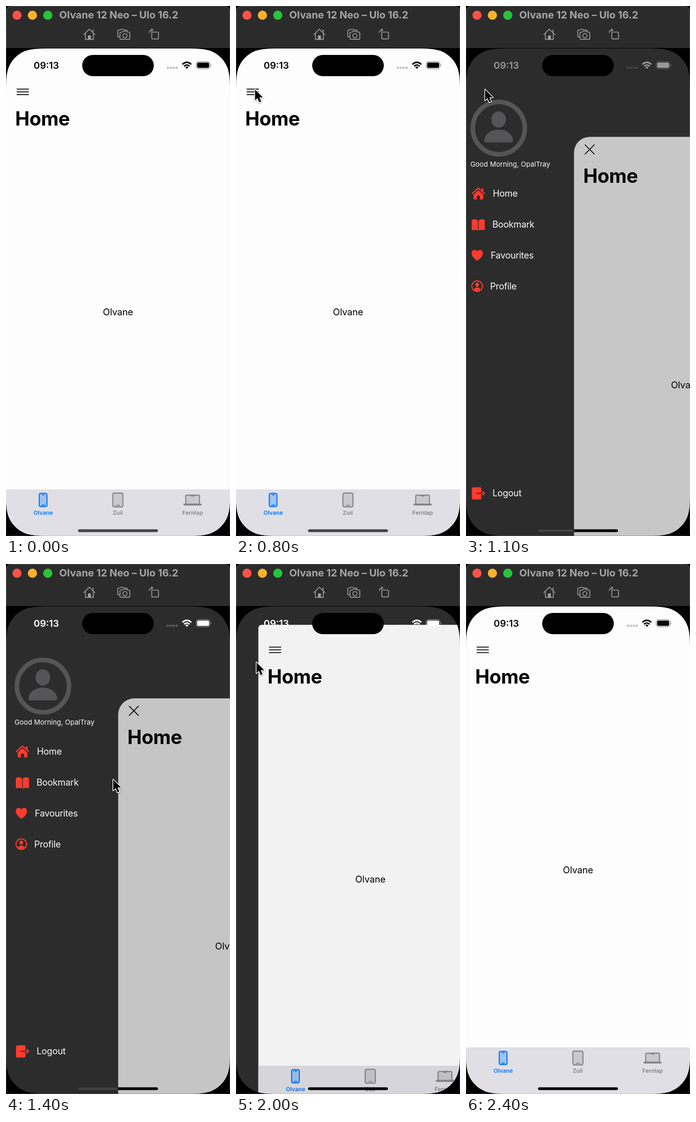
These frames come from a looping animation (488x1148 px, 2.5 s). An HTML page:

```html
<!DOCTYPE html>
<html lang="en">
<head>
<meta charset="utf-8">
<title>Slide menu</title>
<style>
  html, body { margin: 0; width: 100%; height: 100%; overflow: hidden; background: #000; }
  svg { display: block; width: 100%; height: 100%; font-family: Inter, "Liberation Sans", sans-serif; }
  .line { fill: none; stroke-linecap: round; stroke-linejoin: round; }
  .tools { stroke: #a3a3a3; stroke-width: 1.7; }
  .glyph { stroke: #161616; stroke-width: 2; }
  .menu { font-size: 19.6px; letter-spacing: -.25px; fill: #fafafa; }
  .red { fill: #ff3b30; }
  .tab { font-size: 12.4px; font-weight: 600; text-anchor: middle; fill: #85858a; }
  .device { fill: #c8c8cd; stroke: #85858a; stroke-width: 2.4; }
  .on { fill: #0a78f0; }
  .device.on { fill: #9dc3ee; stroke: #0a78f0; }
  #cursor { filter: drop-shadow(0 1.5px 1.5px rgba(0, 0, 0, .4)); }
</style>
</head>
<body>
<svg viewBox="0 0 488 1148" preserveAspectRatio="none">
  <defs>
    <clipPath id="screen"><path id="outline"/></clipPath>
  </defs>

  <rect width="488" height="1148"/>
  <path fill="#2b2b2b" d="M0 91V12Q0 0 12 0H476Q488 0 488 12V91Z"/>
  <circle cx="24" cy="20" r="10" fill="#fe5249"/>
  <circle cx="57.5" cy="20" r="10" fill="#fdb12e"/>
  <circle cx="91" cy="20" r="10" fill="#27c33a"/>
  <text x="116" y="27.3" font-size="22" font-weight="700" fill="#a5a5a5">Olvane 12 Neo – Ulo 16.2</text>
  <g class="line tools">
    <path d="M169.5 62L181.5 50.2L193.7 62M173 60V72.3H190.3V60M189.7 56.5V51.5"/>
    <path fill="#a3a3a3" d="M179.4 72V64.5H184V72Z"/>
    <path d="M247 67H245.500a2 2 0 0 1-2-2V54a2 2 0 0 1 2-2H248l1.500-1.500H255l1.500 1.500H262a2 2 0 0 1 2 2"/>
    <path d="M250.500 56.500H253.500L255.500 54.500H262.500L264.500 56.500H267.500a2.200 2.200 0 0 1 2.200 2.200V70a2.200 2.200 0 0 1-2.200 2.200H250.500a2.200 2.200 0 0 1-2.200-2.200V58.700a2.200 2.200 0 0 1 2.200-2.200Z"/>
    <circle cx="259" cy="64.300" r="4.600"/>
    <rect x="317.500" y="56.500" width="14.800" height="14.800" rx="2"/>
    <path d="M312.300 57.500Q312.300 52 319.500 52M317 49.300L319.800 52L317 54.700"/>
  </g>

  <g clip-path="url(#screen)">
    <rect y="92" width="488" height="1056" fill="#2c2c2c"/>

    <g id="drawer" class="menu">
      <g fill="#555557">
        <circle cx="80.500" cy="264.500" r="56.700" fill="none" stroke="#555557" stroke-width="10"/>
        <ellipse cx="80.300" cy="245.800" rx="16" ry="17.500"/>
        <path d="M49 291C49 279 63 267.500 80.300 267.500S111.500 279 111.500 291Q111.500 295.500 106 295.500H54.500Q49 295.500 49 291Z"/>
      </g>
      <text x="18.500" y="348" font-size="15" letter-spacing="0">Good Morning, OpalTray</text>
      <text x="67.500" y="413">Home</text>
      <text x="66.500" y="480">Bookmark</text>
      <text x="62.800" y="546.500">Favourites</text>
      <text x="61.500" y="613.500">Profile</text>
      <text x="66.800" y="1062">Logout</text>
      <g class="red">
        <path fill="none" stroke="#ff3b30" stroke-width="2.600" stroke-linecap="round" stroke-linejoin="round" d="M23 406L36 394.500L49 406"/>
        <path d="M43.500 395H47V402L43.500 399ZM36 399L46.500 408.500V417Q46.500 419 44.500 419H39.500V411H32.500V419H27.500Q25.500 419 25.500 417V408.500Z"/>
        <path d="M35 464.500Q28 459.500 21.500 464V484Q21.500 486.500 24 485.500Q29.500 483.500 35 486.500ZM36.500 464.500Q43.500 459.500 50 464V484Q50 486.500 47.500 485.500Q42 483.500 36.500 486.500Z"/>
        <path d="M33.500 552C29 549 21.300 542.500 21.300 535.500C21.300 527.500 30.500 525.800 33.500 532C36.500 525.800 46 527.500 46 535.500C46 542.500 38 549 33.500 552Z"/>
        <circle cx="33.300" cy="606.800" r="11.500" fill="none" stroke="#ff3b30" stroke-width="2.200"/>
        <ellipse cx="33.300" cy="603.500" rx="4" ry="4.500"/>
        <path d="M25.500 614.500Q28 609.800 33.300 609.800T41.100 614.500Q37.500 617.500 33.300 617.500T25.500 614.500Z"/>
        <rect x="21.800" y="1042.500" width="20.700" height="26.500" rx="3"/>
        <path class="line" stroke="#2c2c2c" stroke-width="2" d="M32 1055.500H43"/>
        <path class="line" stroke="#ff3b30" stroke-width="2" d="M43.500 1055.500H49M45.500 1051.500L49.500 1055.500L45.500 1059.500"/>
      </g>
    </g>

    <g id="panel">
      <rect class="sheet" y="92" width="488" height="1056" fill="#fdfdfd"/>
      <g id="nav">
        <path id="bars" class="line glyph" d="M24 180H49M24 186H49M24 192H49"/>
        <path id="cross" class="line glyph" d="M24 176L44 196M44 176L24 196"/>
        <text x="20" y="258.500" font-size="42" font-weight="700" letter-spacing="-.4">Home</text>
      </g>
      <text id="label" x="244" font-size="20.300" text-anchor="middle" letter-spacing="-.2">Olvane</text>
      <g id="tabs">
        <rect y="1047" width="488" height="101" fill="#e0dfe5"/>
        <rect class="device on" x="72.500" y="1055.800" width="16.800" height="28.500" rx="3"/>
        <path class="line" stroke="#0a78f0" stroke-width="2" d="M79 1059H83M78 1081H84"/>
        <rect class="device" x="232.800" y="1055" width="22" height="30" rx="3"/>
        <path class="line" stroke="#85858a" stroke-width="1.800" d="M240.500 1081.500H247.500"/>
        <path class="device" d="M391.500 1079V1062Q391.500 1059.500 394 1059.500H419Q421.500 1059.500 421.500 1062V1079Z"/>
        <path fill="#85858a" d="M402 1059H411Q411 1062.500 408.500 1062.500H404.500Q402 1062.500 402 1059ZM386.500 1078H426.500Q426.500 1082 423.500 1082H389.500Q386.500 1082 386.500 1078Z"/>
        <text class="tab on" x="81" y="1102.300">Olvane</text>
        <text class="tab" x="243.500" y="1102.300">Zuil</text>
        <text class="tab" x="406.500" y="1102.300">Fernlap</text>
      </g>
      <rect class="sheet" id="dim" y="92" width="488" height="1056"/>
    </g>

    <g id="status">
      <text x="60.300" y="135.800" font-size="20.600" font-weight="600">09:13</text>
      <g opacity=".24">
        <circle cx="352.600" cy="133.700" r="2.500"/><circle cx="359" cy="133.700" r="2.500"/>
        <circle cx="365.400" cy="133.700" r="2.500"/><circle cx="371.800" cy="133.700" r="2.500"/>
      </g>
      <g fill="none" stroke="currentColor" stroke-width="3.100">
        <path d="M384.300 126.500Q394 117.500 403.700 126.500M388 130.500Q394 125 400 130.500"/>
      </g>
      <path d="M390.500 132.500Q394 129.800 397.500 132.500L394 136.200Z"/>
      <rect x="414.300" y="120.500" width="30.200" height="15.500" rx="5" fill="none" stroke="currentColor" stroke-width="1.300" opacity=".42"/>
      <rect x="416.300" y="122.400" width="26.200" height="11.700" rx="3.300"/>
      <path opacity=".45" d="M446 125.700Q449 128.300 446 130.900Z"/>
    </g>
    <rect x="166" y="106" width="156" height="46" rx="23"/>
    <rect id="grip" x="157" y="1133.500" width="174" height="6" rx="3"/>
    <rect id="gripLeft" x="157" y="1133.500" height="6" rx="3" fill="#434343"/>
  </g>

  <rect x=".8" y=".5" width="486.400" height="1147" rx="12" fill="none" stroke="#fff" stroke-opacity=".2"/>
  <path id="cursor" stroke="#fff" stroke-width="3" stroke-linejoin="round" paint-order="stroke" d="M0 0V23.500L5.300 18.600L9.200 27.600L13.300 25.800L9.500 17H17Z"/>
</svg>

<script>
const LOOP = 2500, STEP = 100;
const OPEN_X = 244.5, OPEN_Y = 199;
const $ = id => document.getElementById(id);
const set = (el, attrs) => { for (const k in attrs) el.setAttribute(k, attrs[k]); };
const shift = (id, x, y) => set($(id), { transform: `translate(${x} ${y})` });

// Rounded rectangle with continuous-curvature corners.
function squircle(x, y, w, h, r) {
  const corner = [[0, 1.528], [0, 1.088], [0, .868], [.075, .631], [.169, .373],
                  [.373, .169], [.631, .075], [.868, 0], [1.088, 0], [1.528, 0]];
  const side = (right, bottom) => {
    const pts = corner.map(([a, b]) =>
      [right ? x + w - a * r : x + a * r, bottom ? y + h - b * r : y + b * r]);
    if (right !== bottom) pts.reverse();
    return pts[0] + 'C' + pts.slice(1).join(' ');
  };
  return 'M' + [side(false, false), side(true, false), side(true, true), side(false, true)].join('L') + 'Z';
}

// Linear interpolation through [time, ...values] keys.
function track(keys, t) {
  if (t <= keys[0][0]) return keys[0].slice(1);
  const i = keys.findIndex(k => k[0] >= t);
  if (i < 0) return keys[keys.length - 1].slice(1);
  const a = keys[i - 1], b = keys[i], f = (t - a[0]) / (b[0] - a[0]);
  return a.slice(1).map((v, n) => v + (b[n + 1] - v) * f);
}

const pointer = [[200, -25, 290], [600, 41.5, 191], [800, 41.5, 181], [1100, 41.5, 181],
                 [1400, 233.5, 467], [1500, 280, 484], [1600, 286, 486], [1900, 286, 486],
                 [2000, 44.5, 213], [2100, -40, 120]];
// time, bars opacity, cross opacity, cross offset
const button = [[900, 1, 0, 0], [1000, 0, .5, 0], [1100, 0, 1, 0], [1800, 0, 1, 0],
                [1900, .45, .85, 2.5], [2000, .95, 0, 2.5]];
const statusTint = [[1000, 0], [1100, .6], [1200, 1], [2000, 1], [2100, .5], [2200, .2], [2400, .04]];

// Critically damped spring, 0 to 1.
const spring = u => u <= 0 ? 0 : 1 - (1 + u) * Math.exp(-u);

function progress(t) {
  return t < 1900 ? spring((t - 900) / 100 * 2.55) : 1 - spring((t - 1900) / 100 * 3);
}

function draw(t) {
  let p = progress(t);
  if (p < .001) p = 0;
  const x = OPEN_X * p, y = OPEN_Y * p;
  const nav = Math.max(0, y - 67);

  shift('drawer', x - OPEN_X, 0);
  shift('panel', x, 0);
  shift('nav', 0, nav);
  shift('tabs', 0, y);
  set($('label'), { y: 670 + (nav + y) / 2 });
  document.querySelectorAll('.sheet').forEach(s => set(s, { y: 92 + y, rx: 35 * p }));
  set($('dim'), { opacity: .225 * p });

  const [bars, cross, offset] = track(button, t);
  set($('bars'), { opacity: bars });
  set($('cross'), { opacity: cross });
  shift('cross', offset, 0);

  const v = Math.round(255 * track(statusTint, t)[0]);
  const tint = `rgb(${v},${v},${v})`;
  set($('status'), { fill: tint, color: tint });

  set($('grip'), { fill: t < 1000 ? '#444347' : '#000' });
  set($('gripLeft'), { width: Math.min(174, Math.max(0, x - 157)) });
  shift('cursor', ...track(pointer, t));
}

$('outline').setAttribute('d', squircle(0, 92, 488, 1055.5, 68));

function tick() {
  const t = performance.now() % LOOP;
  draw(Math.floor(t / STEP) * STEP);
  requestAnimationFrame(tick);
}
tick();
</script>
</body>
</html>
```
